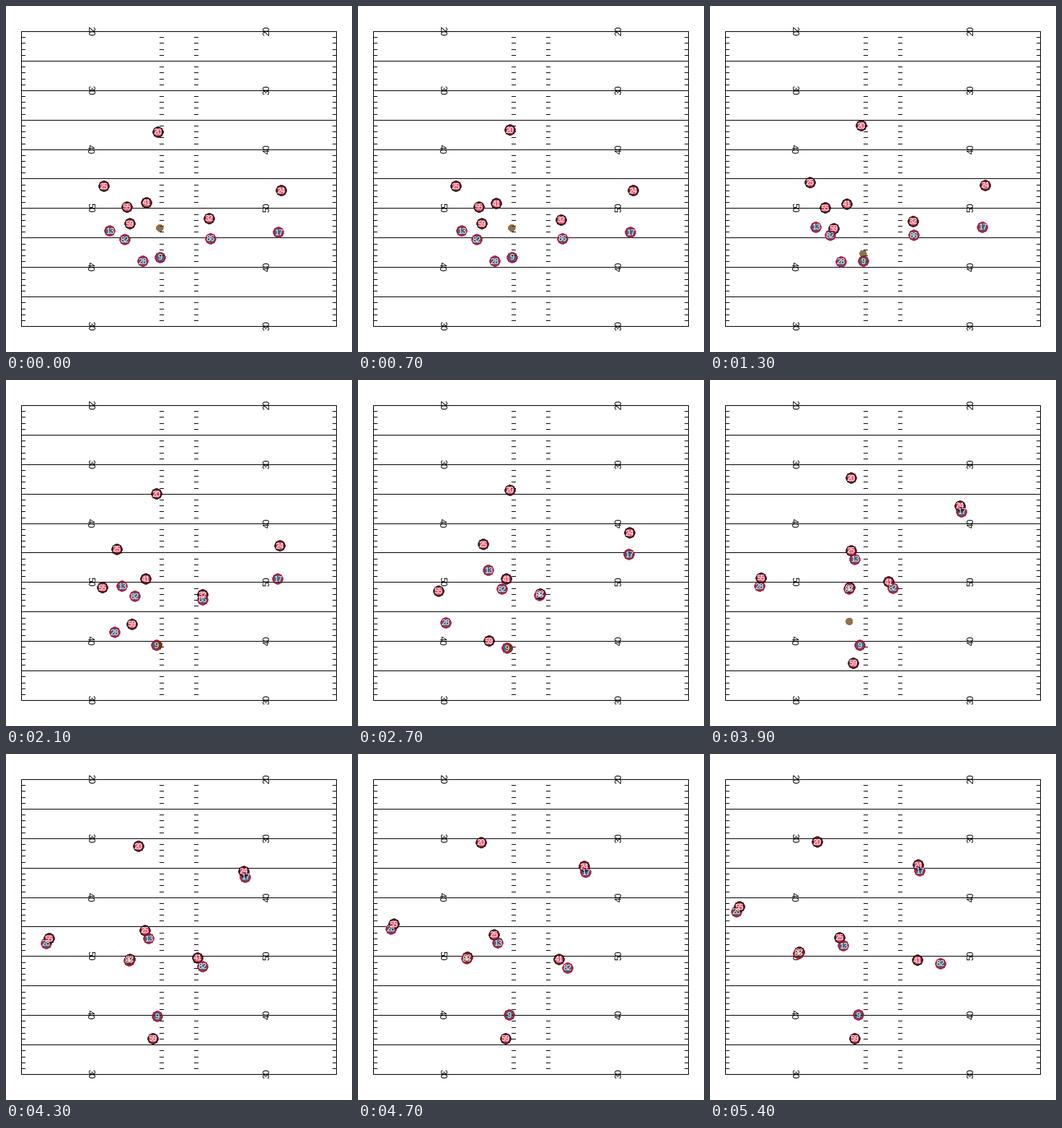
A matplotlib script for the animation above (5500 ms loop, 480 px wide and 480 px high).

```python
import numpy as np
import matplotlib.pyplot as plt
from matplotlib.animation import FuncAnimation
from matplotlib.patches import Circle

SIZE, DPI = 480, 80
FRAMES, INTERVAL = 55, 100
PX = 72 / DPI  # points per pixel

plt.rcParams["font.family"] = "Liberation Sans"

# Play timing in frames
SNAP, SNAP_END, THROW, CATCH = 8, 15, 36, 43
LATER_KEYS = (21, 33, 47, 54)
PASSER, RECEIVER = 9, 86
SPOT = np.array([213.5, 308])
HAND = np.array([3, 0])

# Route waypoints: the start, then one place for each of LATER_KEYS
OFFENSE = {
    28: [(190, 354), (151, 350), (92, 317), (46, 243), (37, 219)],
    86: [(284, 323), (273, 305), (225, 294), (151, 284), (123, 277)],
    82: [(165, 324), (179, 300), (226, 284), (291, 297), (320, 291)],
    13: [(144, 312), (161, 286), (198, 246), (194, 262), (185, 266)],
    17: [(378, 314), (377, 276), (369, 207), (316, 164), (291, 162)],
    9: [(214, 349), (209, 368), (206, 372), (210, 362), (206, 362)],
}
ZONE = {
    20: [(211, 175), (209, 158), (209, 147), (171, 123), (149, 122)],
    41: [(195, 273), (194, 276), (223, 277), (279, 285), (288, 286)],
}
# Marking defenders: opponent, first gap, last gap, time span of closing in
MARKING = {
    24: (17, (4, -58), (-2, -8), (12, 40)),
    55: (28, (-22, -75), (4, -7), (12, 44)),
    32: (86, (-2, -28), (1, -2), (3, 28)),
    25: (13, (-8, -62), (-5, -11), (12, 42)),
    59: (9, (-42, -47), (-5, 33), (10, 46)),
}
DRAW_ORDER = (20, 25, 24, 41, 59, 28, 55, 32, 86, 82, 13, 17, 9)


def follow(points, start, t):
    """Smooth path through the waypoints, leaving the first from rest."""
    times = np.array((start, *LATER_KEYS), float)
    points = np.array(points, float)
    slopes = np.gradient(points, times, axis=0)
    slopes[0] = 0
    t = max(t, start)
    i = min(np.searchsorted(times, t, side="right") - 1, len(times) - 2)
    h = times[i + 1] - times[i]
    s = (t - times[i]) / h
    return ((1 + 2 * s) * (1 - s) ** 2 * points[i]
            + s * (1 - s) ** 2 * h * slopes[i]
            + s * s * (3 - 2 * s) * points[i + 1]
            + s * s * (s - 1) * h * slopes[i + 1])


def smoothstep(t, start, end):
    s = np.clip((t - start) / (end - start), 0, 1)
    return s * s * (3 - 2 * s)


def player_pos(number, t):
    if number in OFFENSE:
        pos = follow(OFFENSE[number], SNAP, t)
    elif number in ZONE:
        pos = follow(ZONE[number], 0, t)
    else:
        rival, first, last, span = MARKING[number]
        first, last = np.array(first), np.array(last)
        gap = first + (last - first) * smoothstep(t, *span)
        pos = player_pos(rival, t) + gap
    return np.round(pos)


def flight(start, end, t0, t1, t):
    return start + (end - start) * (t - t0) / (t1 - t0)


def ball_pos(t):
    if t <= SNAP:
        return SPOT
    if t < SNAP_END:
        return flight(SPOT, player_pos(PASSER, SNAP_END), SNAP, SNAP_END, t)
    if t <= THROW:
        return player_pos(PASSER, t) + HAND
    if t < CATCH:
        start = player_pos(PASSER, THROW) + HAND
        return flight(start, player_pos(RECEIVER, CATCH), THROW, CATCH, t)
    return player_pos(RECEIVER, t)


def draw_field(ax):
    left, right, top, yard = 21, 459, 35.4, 8.18
    # Unsnapped lines through pixel centres fill exactly one pixel row
    line = dict(colors="black", linewidth=PX, snap=False, zorder=1)
    rows = [int(top + 5 * yard * k) for k in range(11)]
    ax.hlines([y + 0.5 for y in rows], left, right, **line)
    ax.vlines([left + 0.5, right - 0.5], rows[0], rows[-1] + 1, **line)

    ticks = [int(top + 0.2 + yard * k) + 0.5 for k in range(50) if k % 5]
    for x in (left, 213, 261, right - 6):
        ax.hlines(ticks, x, x + 6, **line)

    label = dict(fontsize=12 * PX, color="black", ha="center", va="baseline",
                 rotation_mode="anchor", zorder=2)
    for y, yards in zip(rows[::2], (20, 30, 40, 50, 40, 30)):
        ax.text(113, y - 0.5, str(yards), rotation=270, **label)
        ax.text(365.5, y - 0.5, str(yards), rotation=90, **label)


fig = plt.figure(figsize=(SIZE / DPI, SIZE / DPI), dpi=DPI, facecolor="white")
ax = fig.add_axes([0, 0, 1, 1])
ax.set_xlim(0, SIZE)
ax.set_ylim(SIZE, 0)
ax.axis("off")
draw_field(ax)

dots, tags = {}, {}
for n in DRAW_ORDER:
    fill, edge = ("#002244", "#c60c30") if n in OFFENSE else ("#e31837", "black")
    dots[n] = ax.add_patch(Circle((0, 0), 6.5, facecolor=fill, edgecolor=edge,
                                  linewidth=1.2 * PX, alpha=0.7,
                                  antialiased=False, zorder=3))
    tags[n] = ax.text(0, 0, str(n), color="white", fontsize=11 * PX,
                      ha="center", va="baseline", zorder=5)
ball = ax.add_patch(Circle(SPOT, 4.6, facecolor="#663300", linewidth=0,
                           alpha=0.7, antialiased=False, zorder=4))


def update(t):
    for n in DRAW_ORDER:
        x, y = player_pos(n, t)
        dots[n].center = (x, y)
        tags[n].set_position((x, y + 3.5))
    ball.center = tuple(ball_pos(t))
    return [*dots.values(), *tags.values(), ball]


anim = FuncAnimation(fig, update, frames=FRAMES, interval=INTERVAL,
                     repeat=True, repeat_delay=0)
plt.show()
```
